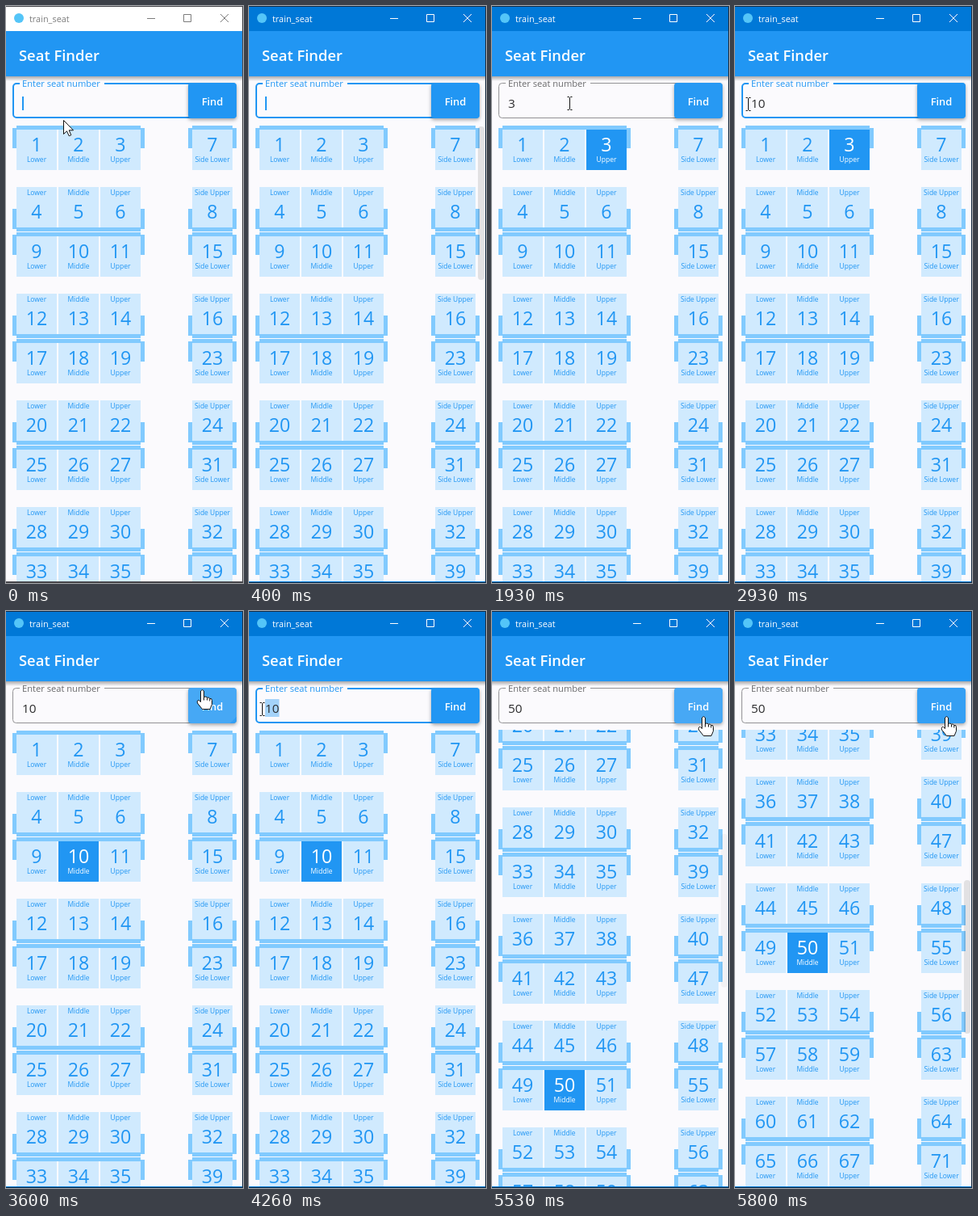
Write an HTML page with a canvas that moves like this. It is 294x714 px and loops after 6400 ms.

```html
<!DOCTYPE html>
<html lang="en">
<head>
<meta charset="utf-8">
<title>Seat Finder</title>
<style>
html, body { margin: 0; width: 294px; height: 714px; overflow: hidden; }
canvas { display: block; }
</style>
</head>
<body>
<canvas id="stage" width="294" height="714"></canvas>
<script>
const g = document.getElementById('stage').getContext('2d');
const LOOP = 6400, STEP = 1000 / 15, BLUE = '#2196f3', PAGE = '#fbfafd';
const FACE = '"Open Sans", "Noto Sans", sans-serif';

const clamp = v => Math.max(0, Math.min(1, v));
const ramp = (t, from, length) => clamp((t - from) / length);
const within = (t, from, to) => t >= from && t < to;
const latest = (t, list) => list.filter(item => item[0] <= t).pop();
const mix = (a, b, k) => `rgb(${a.map((v, i) => v + (b[i] - v) * k)})`;

// Cubic Bézier (.25, .1, .25, 1)
function ease(x) {
  let lo = 0, hi = 1, s = 0.5;
  for (let i = 0; i < 24; i++) {
    s = (lo + hi) / 2;
    const px = 0.75 * s * (1 - s) + s ** 3;
    if (px < x) lo = s; else hi = s;
  }
  return 0.3 * s * (1 - s) ** 2 + 3 * s * s * (1 - s) + s ** 3;
}

function rect(color, x, y, w, h) {
  g.fillStyle = color;
  g.fillRect(x, y, w, h);
}

function text(str, x, y, size, color, align = 'left', weight = 400) {
  g.font = `${weight} ${size}px ${FACE}`;
  g.fillStyle = color;
  g.textAlign = align;
  g.fillText(str, x, y);
}

function line(color, width, path) {
  g.strokeStyle = color;
  g.lineWidth = width;
  g.stroke(new Path2D(path));
}

function rounded(x, y, w, h, r) {
  g.beginPath();
  g.roundRect(x, y, w, h, r);
}

// Timeline: [time, value]
const typed = [[0, ''], [800, '3'], [2530, '1'], [2660, '10'], [4660, '5'], [4800, '50']];
const found = [[0, 0], [1600, 3], [3460, 10], [5412, 50]];
const clicks = [[1510, 258, 116], [3380, 243, 97], [5320, 262, 130]];
const focusClicks = [2060, 4100];
const caretOn = [[0, 130], [400, 660], [800, 1060], [2530, 2930], [4660, 5060]];
const selected = [[2130, 2530], [4190, 4660]];
const pointer = [
  [60, 71, 141], [260, 103, 144], [1230, 291, 112], [1460, 258, 116],
  [1700, 258, 116], [2060, 32, 121], [2200, 16, 121], [3090, 16, 121],
  [3260, 150, 12], [3400, 243, 97], [3730, 243, 97], [4100, 42, 121],
  [4260, 16, 121], [5030, 16, 121], [5300, 262, 130], [LOOP, 262, 130]
];

function pointerAt(t) {
  if (within(t, 400, 1230)) return null;
  const i = pointer.findIndex(p => p[0] > t);
  const b = pointer[i], a = pointer[i - 1] || b;
  if (a[0] === 260) return { x: a[1], y: a[2] };
  let k = a === b ? 0 : (t - a[0]) / (b[0] - a[0]);
  k = k * k * (3 - 2 * k);
  return { x: a[1] + (b[1] - a[1]) * k, y: a[2] + (b[2] - a[2]) * k };
}

const overButton = p => p && p.x >= 226 && p.x <= 286 && p.y >= 95 && p.y <= 139;
const overField = p => p && p.x >= 8 && p.x < 226 && p.y >= 95 && p.y <= 139;

function focusAt(t) {
  let f = 1;
  clicks.forEach(([time], i) => {
    if (t >= time) f = 1 - ramp(t, time, 120);
    if (t >= focusClicks[i]) f = ramp(t, focusClicks[i], 120);
  });
  return f;
}

function seat(n, x, y, label, upper, mark) {
  const on = n === mark, ink = on ? '#fff' : BLUE;
  rect(on ? BLUE : '#d0eafe', x, y, 50, 50);
  text(n, x + 25, y + (upper ? 39 : 27), 23.2, ink, 'center');
  text(label, x + 25, y + (upper ? 10 : 40), 8.5, ink, 'center');
}

function bench(x, w, y, upper) {
  const color = '#81cafe';
  rect(color, x, upper ? y + 50 : y - 5, w, 5);
  for (const side of [x - 5, x + w]) rect(color, side, upper ? y + 27 : y - 2, 5, 25);
}

function list(t) {
  const offset = Math.round(547 * ease(ramp(t, 5412, 300)));
  const mark = latest(t, found)[1];
  g.save();
  g.beginPath();
  g.rect(0, 147, 293, 565);
  g.clip();
  for (let bay = 0; bay < 9; bay++) {
    for (const upper of [false, true]) {
      const y = 153 + bay * 132 - offset + (upper ? 71 : 0);
      const first = bay * 8 + (upper ? 4 : 1);
      bench(13, 154, y, upper);
      bench(231, 50, y, upper);
      ['Lower', 'Middle', 'Upper'].forEach((label, i) =>
        seat(first + i, 13 + 52 * i, y, label, upper, mark));
      seat(bay * 8 + (upper ? 8 : 7), 231, y, upper ? 'Side Upper' : 'Side Lower', upper, mark);
    }
  }
  const shown = t < 3000 ? (t < 400 ? 0 : 1 - ramp(t, 1130, 300)) : ramp(t, 5430, 300);
  g.fillStyle = `rgba(0,0,0,${0.1 * shown})`;
  rounded(284, 149 + offset * 184 / 547, 8, 190, 4);
  g.fill();
  g.restore();
}

function field(t) {
  const f = focusAt(t), value = latest(t, typed)[1];
  const width = 1 + f, inset = width / 2;
  g.strokeStyle = mix([146, 146, 148], [33, 150, 243], f);
  g.lineWidth = width;
  rounded(8 + inset, 95 + inset, 278 - width, 44 - width, 4);
  g.stroke();
  rect(PAGE, 17, 94, 105, 5);
  text('Enter seat number', 20, 100, 11.15, mix([105, 105, 107], [33, 150, 243], f));

  g.font = `400 15.3px ${FACE}`;
  const end = 20 + g.measureText(value).width;
  if (selected.some(s => within(t, ...s))) rect('#a4d3fa', 20, 109, end - 20, 22);
  text(value, 20, 126, 15.3, '#2c2c2e');
  if (caretOn.some(c => within(t, ...c))) rect(BLUE, Math.round(end), 112, 2, 17);
}

function button(t, p) {
  g.save();
  g.shadowColor = 'rgba(0,0,0,.35)';
  g.shadowBlur = 4;
  g.shadowOffsetY = 2;
  g.fillStyle = BLUE;
  rounded(226, 95, 60, 44, 4);
  g.fill();
  g.restore();

  g.save();
  g.clip();
  if (overButton(p)) rect('rgba(255,255,255,.08)', 226, 95, 60, 44);
  const click = latest(t, clicks);
  if (click) {
    const age = t - click[0];
    g.fillStyle = `rgba(255,255,255,${0.1 * (1 - ramp(age, 220, 280))})`;
    g.beginPath();
    g.arc(click[1], click[2], 8 + 60 * Math.min(1.2, (age / 250) ** 2), 0, 7);
    g.fill();
  }
  g.restore();
  text('Find', 256, 123, 12.9, '#fff', 'center', 600);
}

function appBar() {
  const shade = g.createLinearGradient(0, 87, 0, 93);
  shade.addColorStop(0, 'rgba(0,0,0,.32)');
  shade.addColorStop(1, 'rgba(0,0,0,0)');
  rect(shade, 0, 87, 293, 6);
  rect(BLUE, 0, 31, 293, 56);
  text('Seat Finder', 16, 68, 18.4, '#fff', 'left', 600);
}

function windowFrame(active) {
  const ink = active ? '#fff' : '#7c7c7c';
  rect(active ? '#0078d7' : '#fff', 0, 0, 294, 31);
  g.fillStyle = '#54c5f8';
  g.beginPath();
  g.arc(16, 15, 6, 0, 7);
  g.fill();
  text('train_seat', 29, 20, 10.9, ink);
  line(ink, 1, 'M175 15.5H185M220.5 10.5H229.5V19.5H220.5ZM266 10L276 20M276 10L266 20');
  const edge = active ? '#1b2f45' : '#48484c';
  rect(edge, 0, 0, 294, 1);
  rect(active ? '#0078d7' : edge, 0, 712, 294, 1);
  rect(edge, 0, 713, 294, 1);
  rect(edge, 293, 0, 1, 714);
}

const ARROW = 'M0 0V17L4 13.3L6.7 19.3L9.3 18.2L6.7 12.3H12Z';
const HAND = 'M-2 1.5Q0-1.5 2 1.5V9Q4.5 7.5 6 9.7Q8 8.5 9.3 11Q12 10.2 12 13V18L9.5 24H0L-6 16.5Q-7 12.5-4 13L-2 15Z';
const BEAM = 'M-3-8H-1L0-7L1-8H3M0-7V7M-3 8H-1L0 7L1 8H3';

function cursor(p) {
  if (!p) return;
  g.save();
  g.translate(Math.round(p.x) + 0.5, Math.round(p.y) + 0.5);
  if (overField(p)) {
    line('#111', 1, BEAM);
  } else {
    const shape = overButton(p) ? HAND : ARROW;
    g.fillStyle = '#fff';
    g.fill(new Path2D(shape));
    line('#111', 1, shape);
    if (shape === HAND) line('#111', 1, 'M2 9V13M6 10V13M9.3 11V14');
  }
  g.restore();
}

function draw() {
  const now = performance.now() % LOOP;
  const t = Math.floor((now + 7) / STEP) * STEP % LOOP;
  const p = pointerAt(t);
  rect(PAGE, 0, 0, 294, 714);
  list(t);
  appBar();
  field(t);
  button(t, p);
  windowFrame(t >= 400);
  cursor(p);
  requestAnimationFrame(draw);
}
draw();
</script>
</body>
</html>
```
